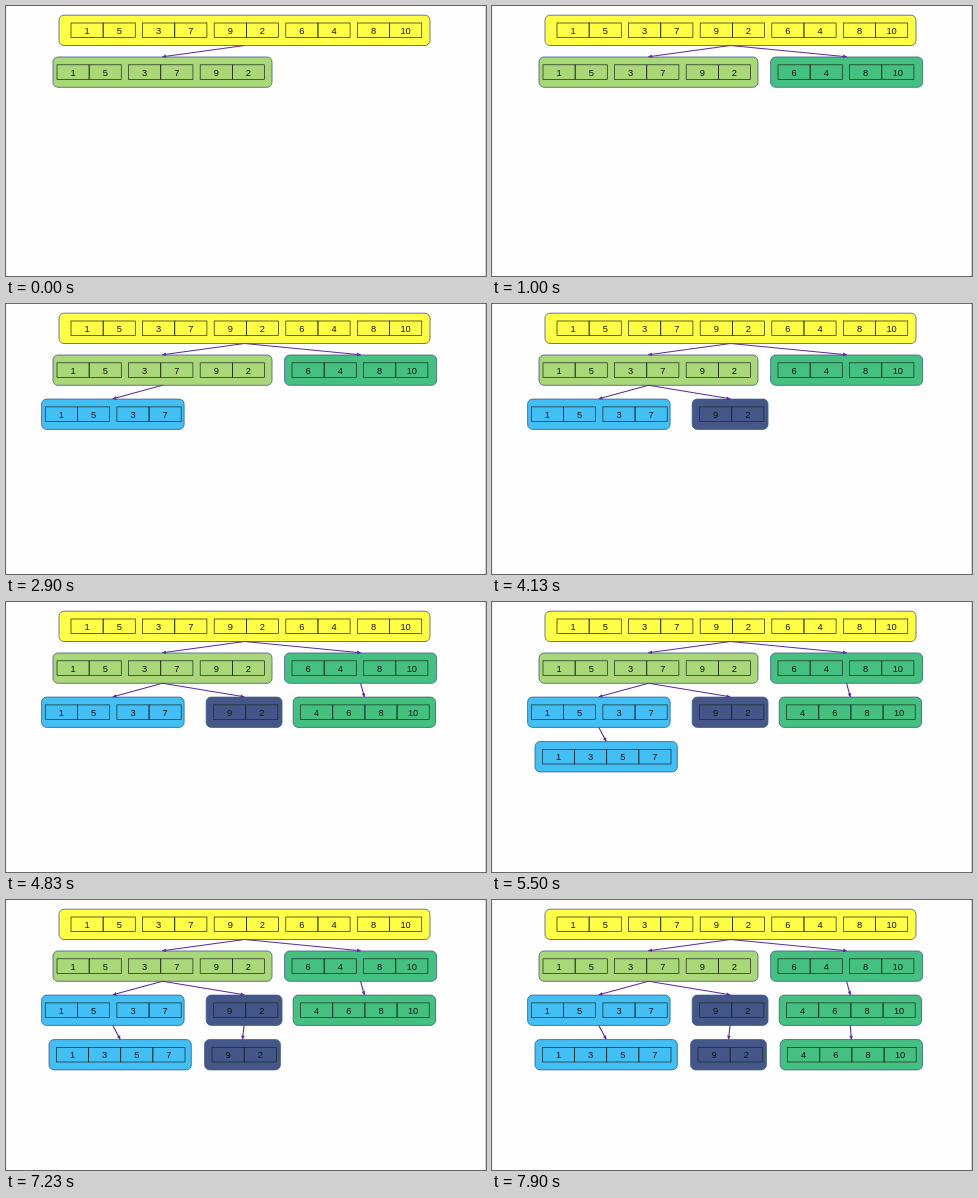
An HTML page for the animation above (8000 ms loop, 480 px wide and 270 px high).

```html
<!DOCTYPE html>
<html lang="en">
<head>
<meta charset="utf-8">
<title>Splitting and merging pairs</title>
<style>
  html, body { margin: 0; width: 100%; height: 100%; overflow: hidden; background: #fefefe; }
  svg { display: block; width: 100vw; height: 100vh; }
  .box { stroke: #3f5c88; stroke-width: .8; }
  .cell { fill: none; stroke: #1c2a20; stroke-width: .7; }
  .arrow { stroke: #5a2ca0; stroke-width: 1.1; }
  .head { fill: #5a2ca0; }
  text { font: 9.3px "Liberation Sans", Arial, sans-serif; text-anchor: middle; fill: #111; }
</style>
</head>
<body>
<svg id="stage" viewBox="0 0 480 270">
  <path d="M.5 0V270" stroke="#eeeeee"/>
  <path d="M479.5 0V270" stroke="#d0d0d0"/>
</svg>
<script>
const LOOP = 8000, FIRST_STEP = 785, STEP = 1140;
const ROW_TOPS = [9.2, 51, 95.1, 139.6], BOX_HEIGHT = 30.3;
const CELL = 32.15, CELL_HEIGHT = 14.6, CELL_TOP = 7.8, PAIR_GAP = 7.3;
const YELLOW = '#ffff45', LIME = '#aad778', GREEN = '#44c080', BLUE = '#42bff5', NAVY = '#445788';
const stage = document.getElementById('stage');

function add(parent, tag, attributes, content = '') {
  const node = document.createElementNS('http://www.w3.org/2000/svg', tag);
  for (const [key, value] of Object.entries(attributes)) node.setAttribute(key, value);
  node.textContent = content;
  parent.append(node);
  return node;
}

// Joins the bottom centre of the parent box to the top centre of its child.
function drawArrow(group, parent, child) {
  const x1 = parent.middle, y1 = parent.top + BOX_HEIGHT;
  const x2 = child.middle, y2 = child.top - .3;
  const angle = Math.atan2(y2 - y1, x2 - x1) * 180 / Math.PI;
  add(group, 'line', { class: 'arrow', x1, y1, x2, y2 });
  add(group, 'path', {
    class: 'head', d: 'M.5 0L-3.5 -1.8V1.8Z',
    transform: `translate(${x2} ${y2}) rotate(${angle})`
  });
}

// Cells touch within a run; "|" separates runs.
function drawCells(group, x, y, values) {
  for (const run of values.split('|')) {
    for (const value of run.split(' ')) {
      add(group, 'rect', { class: 'cell', x, y, width: CELL, height: CELL_HEIGHT });
      add(group, 'text', { x: x + CELL / 2, y: y + 10.7 }, value);
      x += CELL;
    }
    x += PAIR_GAP;
  }
}

function makePanel(parent, row, x, width, fill, values, inset = 7.4) {
  const group = add(stage, 'g', {});
  const panel = { group, top: ROW_TOPS[row], middle: x + width / 2 };
  add(group, 'rect', { class: 'box', x, y: panel.top, width, height: BOX_HEIGHT, rx: 5, fill });
  drawCells(group, x + inset, panel.top + CELL_TOP, values);
  if (parent) drawArrow(group, parent, panel);
  return panel;
}

const root = makePanel(null, 0, 53, 371, YELLOW, '1 5|3 7|9 2|6 4|8 10', 12);
const left = makePanel(root, 1, 47, 219, LIME, '1 5|3 7|9 2', 4);
const right = makePanel(root, 1, 278.6, 152, GREEN, '6 4|8 10');
const leftPairs = makePanel(left, 2, 35.6, 142.5, BLUE, '1 5|3 7', 3.7);
const lastPair = makePanel(left, 2, 200.2, 75.8, NAVY, '9 2');
const rightMerged = makePanel(right, 2, 287.2, 142.3, GREEN, '4 6 8 10');
const leftMerged = makePanel(leftPairs, 3, 43, 142.3, BLUE, '1 3 5 7');
const lastCopy = makePanel(lastPair, 3, 198.6, 75.8, NAVY, '9 2');
const rightCopy = makePanel(rightMerged, 3, 288.2, 142.3, GREEN, '4 6 8 10');

// The root and left panels are always shown; the others appear one per step.
const steps = [right, leftPairs, lastPair, rightMerged, leftMerged, lastCopy, rightCopy];

const start = performance.now();
function render() {
  const time = (performance.now() - start) % LOOP;
  steps.forEach(({ group }, i) => {
    group.setAttribute('visibility', time >= FIRST_STEP + i * STEP ? 'visible' : 'hidden');
  });
  requestAnimationFrame(render);
}
render();
</script>
</body>
</html>
```
